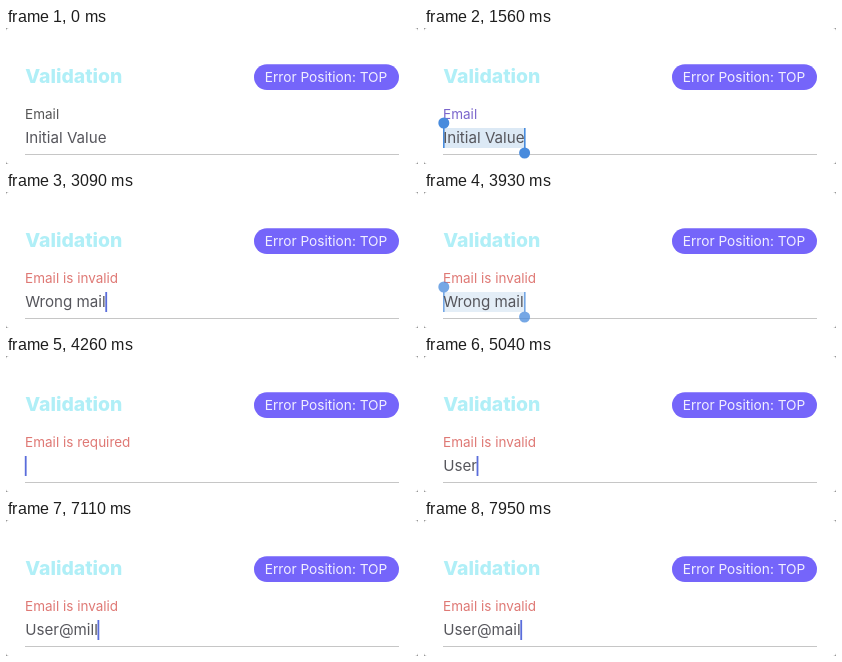
Recreate the animation shown at these times as an HTML page. Size 412 by 136 pixels, loop 8 s.

```html
<!DOCTYPE html>
<html lang="en">
<head>
<meta charset="utf-8">
<title>Validation field</title>
<style>
  html, body { margin: 0; width: 100%; height: 100%; overflow: hidden; background: #8c8c8c; }
  svg { display: block; width: 100vw; height: 100vh; }
  text { font-family: Inter, Roboto, sans-serif; white-space: pre; }
  #title { font-size: 19.4px; font-weight: 800; fill: #b0eff7; }
  #label { font-size: 13.5px; }
  #value { font-size: 15.15px; fill: #56565c; }
  .pill { font-size: 13.7px; fill: #f1efff; text-anchor: middle; }
</style>
</head>
<body>
<svg viewBox="0 0 412 136">
  <rect width="412" height="136" rx="3" fill="#fff"/>
  <text id="title" x="19.3" y="55.2">Validation</text>
  <rect x="248" y="36.2" width="145" height="25.8" rx="12.9" fill="#7565fa"/>
  <text class="pill" x="320" y="54">Error Position: TOP</text>
  <text id="label" x="19.1" y="91.2"></text>
  <rect x="19" y="126" width="374" height="1" fill="#c6c6c6"/>
  <g id="selection">
    <rect x="19.8" y="100" width="81" height="20" fill="#dce9f5"/>
    <g fill="#488bdd">
      <rect x="19" y="95" width="1.6" height="25"/>
      <rect x="100" y="100" width="1.6" height="25"/>
      <circle cx="19.8" cy="95" r="5.5"/>
      <circle cx="100.6" cy="125" r="5.5"/>
    </g>
  </g>
  <text id="value" x="19.2" y="115.2"></text>
  <rect id="caret" y="100" width="1.8" height="20" fill="#5a6ddb"/>
</svg>
<script>
const LOOP = 8000, LEFT = 18.8;
const RED = '#df7975';
const $ = id => document.getElementById(id);
const [label, value, caret, selection] = ['label', 'value', 'caret', 'selection'].map($);

const values = [
  [0, 'Initial Value'],
  ...typed('Wrong mail', '', [2100, 2250, 2430, 2550, 2640, 2700, 2760, 2850, 2940, 3090]),
  [4050, ''],
  ...typed('User@n', '', [4620, 4680, 4890, 5040, 5280, 5700]),
  [6240, 'User@'],
  ...typed('mill', 'User@', [6480, 6720, 6930, 7110]),
  [7380, 'User@mil'], [7500, 'User@mi'], [7650, 'User@m'],
  ...typed('ail', 'User@m', [7740, 7860, 7950])
];
const labels = [
  [0, ['Email', '#565656']],
  [1080, ['Email', '#7b66cc']],
  [2100, ['Email is invalid', RED]],
  [4050, ['Email is required', RED]],
  [4620, ['Email is invalid', RED]]
];
const caretShown = [[0, false], [1080, true], [1350, false], [2100, true], [3630, false], [4050, true]];

function typed(text, before, times) {
  return times.map((time, i) => [time, before + text.slice(0, i + 1)]);
}

function at(steps, t) {
  let state;
  for (const [time, next] of steps) if (time <= t) state = next;
  return state;
}

const ramp = (t, start, length) => Math.min(1, Math.max(0, (t - start) / length));

// Opacity of a selection that fades in, holds and fades out
const fade = (t, shown, hidden) => ramp(t, shown, 240) * (1 - ramp(t, hidden, 210));

function draw(now) {
  const t = now % LOOP;
  const [text, color] = at(labels, t);
  label.textContent = text;
  label.setAttribute('fill', color);
  value.textContent = at(values, t);
  caret.setAttribute('x', LEFT + (value.textContent ? value.getComputedTextLength() : 0));
  caret.setAttribute('opacity', at(caretShown, t) ? 1 : 0);
  selection.setAttribute('opacity', fade(t, 1320, 2070) + fade(t, 3750, 4050));
}

const start = performance.now();
function tick() {
  draw(performance.now() - start);
  requestAnimationFrame(tick);
}
tick();
</script>
</body>
</html>
```
